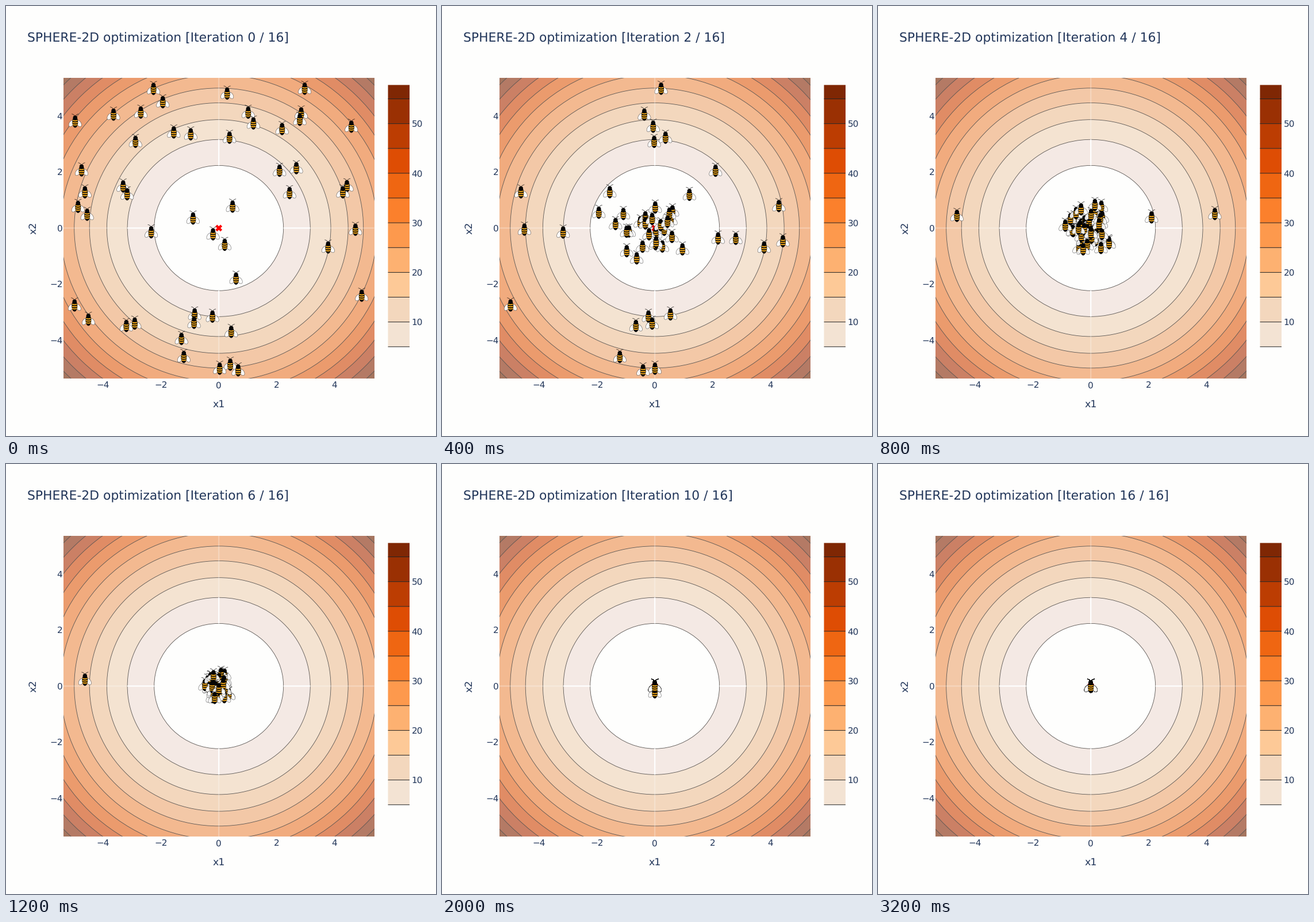
Recreate the animation shown at these times as a matplotlib script. Size 748 by 748 pixels, loop 3.4 s.

```python
import math
import numpy as np
import matplotlib.pyplot as plt
from matplotlib.animation import FuncAnimation
from matplotlib.collections import PathCollection
from matplotlib.patches import Ellipse, Rectangle
from matplotlib.path import Path

plt.rcParams["text.hinting"] = "none"

SIZE, DPI = 748, 100
PT = 72 / DPI
ITERATIONS, BEES = 16, 50
CX, CY = 370.2, 386.3
UX, UY = 50.3, 48.7
LEFT, RIGHT, TOP, BOTTOM = 99.8, 640.6, 124.8, 648.2
INK = "#22365a"
BACK = "#fefefd"

RINGS = ["#ffffff", "#f4e9e4", "#f4e3d1", "#f3d7bd", "#f3c8a7", "#f3b990",
         "#f1ab7e", "#eb9b6d", "#e08c65", "#cb8065", "#b47a65", "#a5755f"]
BAR = ["#f3e3d3", "#f3d7bd", "#fdc997", "#fdb171", "#fd994d", "#fb802c",
       "#ef6612", "#de4d04", "#bc3d02", "#9a3003", "#7f2704"]

# Slow bees: start x, start y, iteration at which x and then y reach the swarm
SLOW = [
    (-4.63, 1.3, 7, 4), (-4.51, -3.25, 4, 2), (3.78, -0.67, 4, 3),
    (4.29, 1.3, 6, 2), (2.1, 2.07, 5, 4), (4.43, 1.52, 3, 2),
    (2.8, 3.89, 3, 2), (0.03, -5.0, 1, 3), (-1.21, -4.58, 4, 4),
    (-0.22, -3.14, 4, 3), (0.37, 3.25, 4, 3), (2.97, 5.0, 2, 3),
    (-3.17, 1.23, 4, 2), (0.67, -5.06, 2, 3), (-0.2, -0.2, 9, 15),
]

rng = np.random.default_rng(7)
slow = np.array(SLOW)
free = (BEES - len(slow), 2)
# The other bees start denser at the upper left and join within three moves.
start = np.vstack([slow[:, :2],
                   (10 * rng.random(free) ** 1.3 - 5) * (1, -1)])
joins = np.vstack([slow[:, 2:], 1 + np.floor(3 * rng.random(free) ** 2)])
offset = rng.normal(size=start.shape)
order = np.argsort(-start[:, 1])


def bee_places(k):
    """Each coordinate jumps on its own into a swarm that shrinks to zero."""
    spread = 0.9 * max(0, 1 - k / 10) ** 1.5
    xy = np.where(k >= joins, offset * spread, start)[order]
    return np.column_stack([CX + xy[:, 0] * UX, CY - xy[:, 1] * UY])


def oval(cx, cy, rx, ry, tilt=0):
    t = np.linspace(0, 2 * math.pi, 25)
    a = math.radians(tilt)
    x, y = rx * np.cos(t), ry * np.sin(t)
    return Path(np.column_stack([cx + x * math.cos(a) - y * math.sin(a),
                                 cy + x * math.sin(a) + y * math.cos(a)]))


def stripe(y, half, thick):
    x = np.linspace(-half, half, 9)
    sag = 0.8 * (1 - (x / half) ** 2)
    return Path(np.vstack([np.column_stack([x, y + sag - thick / 2]),
                           np.column_stack([x, y + sag + thick / 2])[::-1]]))


def feeler(side):
    points = [(side * 0.8, -9), (side * 2, -11.5), (side * 6, -12.2)]
    return Path(points, [Path.MOVETO, Path.CURVE3, Path.CURVE3])


# Each part: path, fill, edge, line width in pixels
CLEAR = (0, 0, 0, 0)
WING, WING_EDGE = (1, 1, 1, 0.9), (0.25, 0.25, 0.25, 0.8)
BLACK, YELLOW = (0.02, 0.02, 0.02, 1), (0.98, 0.68, 0.1, 1)
PARTS = [(feeler(s), CLEAR, (0, 0, 0, 0.85), 0.7) for s in (-1, 1)]
PARTS += [(oval(s * 6.6, 4.4, 3.7, 6.2, s * -32), WING, WING_EDGE, 0.6)
          for s in (-1, 1)]
PARTS += [(oval(0, 2, 5, 9.8), BLACK, CLEAR, 0),
          (oval(0, -6, 3.7, 3.4), BLACK, CLEAR, 0)]
PARTS += [(stripe(3.6 * i - 1, 4.5 - 0.4 * abs(i - 1), 1.9),
           YELLOW, CLEAR, 0) for i in range(3)]

fig = plt.figure(figsize=(SIZE / DPI, SIZE / DPI), dpi=DPI, facecolor=BACK)
ax = fig.add_axes([0, 0, 1, 1])
ax.set_xlim(0, SIZE)
ax.set_ylim(SIZE, 0)
ax.axis("off")


def label(x, y, text, px, **kw):
    style = dict(ha="center", va="baseline", color=INK,
                 family="DejaVu Sans", fontsize=px * PT)
    return ax.text(x, y, text, **{**style, **kw})


def line(xs, ys, color, px, **kw):
    ax.plot(xs, ys, color=color, lw=px * PT, solid_capstyle="butt",
            snap=False, **kw)


def draw_contours():
    frame = Rectangle((LEFT, TOP), RIGHT - LEFT, BOTTOM - TOP,
                      fc=RINGS[-1], ec="none")
    ax.add_patch(frame)
    for level in range(55, 0, -5):
        r = math.sqrt(level)
        ring = Ellipse((CX, CY), 2 * r * UX, 2 * r * UY, ec="#5a5653",
                       fc=RINGS[level // 5 - 1] if level > 5 else BACK,
                       lw=0.85 * PT)
        ax.add_patch(ring)
        ring.set_clip_path(frame)
    inner, outer = math.sqrt(5), math.sqrt(10)
    for s, x_edge, y_edge in ((-1, LEFT, TOP), (1, RIGHT, BOTTOM)):
        xs = [CX + s * inner * UX, CX + s * outer * UX, x_edge]
        ys = [CY + s * inner * UY, CY + s * outer * UY, y_edge]
        for i, alpha in ((0, 1), (1, 0.27)):
            line(xs[i:i + 2], [CY, CY], "white", 2.2, alpha=alpha)
            line([CX, CX], ys[i:i + 2], "white", 2.2, alpha=alpha)


def draw_axes():
    for v in range(-4, 5, 2):
        text = str(v).replace("-", "\u2212")
        label(CX + v * UX, 664.5, text, 15.2)
        label(98.4, CY - v * UY + 5.5, text, 15.2, ha="right")
    label(CX, 698, "x1", 17.5)
    label(47.6, CY, "x2", 17.5, rotation=90, va="center")


def draw_colorbar():
    def bar_y(value):
        return 635.9 - 8.625 * value
    for i, color in enumerate(BAR):
        low, high = 5 * i + 5, min(5 * i + 10, 57.8)
        ax.add_patch(Rectangle((664.5, bar_y(high)), 37.5,
                               bar_y(low) - bar_y(high), fc=color, ec="none",
                               snap=False))
    for value in range(5, 60, 5):
        line([664.5, 702], [bar_y(value)] * 2, "#222222", 1)
    for value in range(10, 60, 10):
        label(705.5, bar_y(value) + 5.5, str(value), 15.2, ha="left")


draw_contours()
draw_axes()
draw_colorbar()
for s in (-1, 1):
    line([CX - 4.4, CX + 4.4], [CY - s * 4.4, CY + s * 4.4], "#ff0000", 4.3)

title = label(36.6, 62, "", 21.85, ha="left")
bees = PathCollection([], facecolors=[p[1] for p in PARTS],
                      edgecolors=[p[2] for p in PARTS],
                      linewidths=[p[3] * PT for p in PARTS], zorder=5)
ax.add_collection(bees, autolim=False)


def update(k):
    title.set_text(f"SPHERE-2D optimization [Iteration {k} / {ITERATIONS}]")
    bees.set_paths([Path(part[0].vertices + place, part[0].codes)
                    for place in bee_places(k) for part in PARTS])
    return title, bees


anim = FuncAnimation(fig, update, frames=ITERATIONS + 1, interval=200,
                     repeat=True, repeat_delay=0)
plt.show()
```
